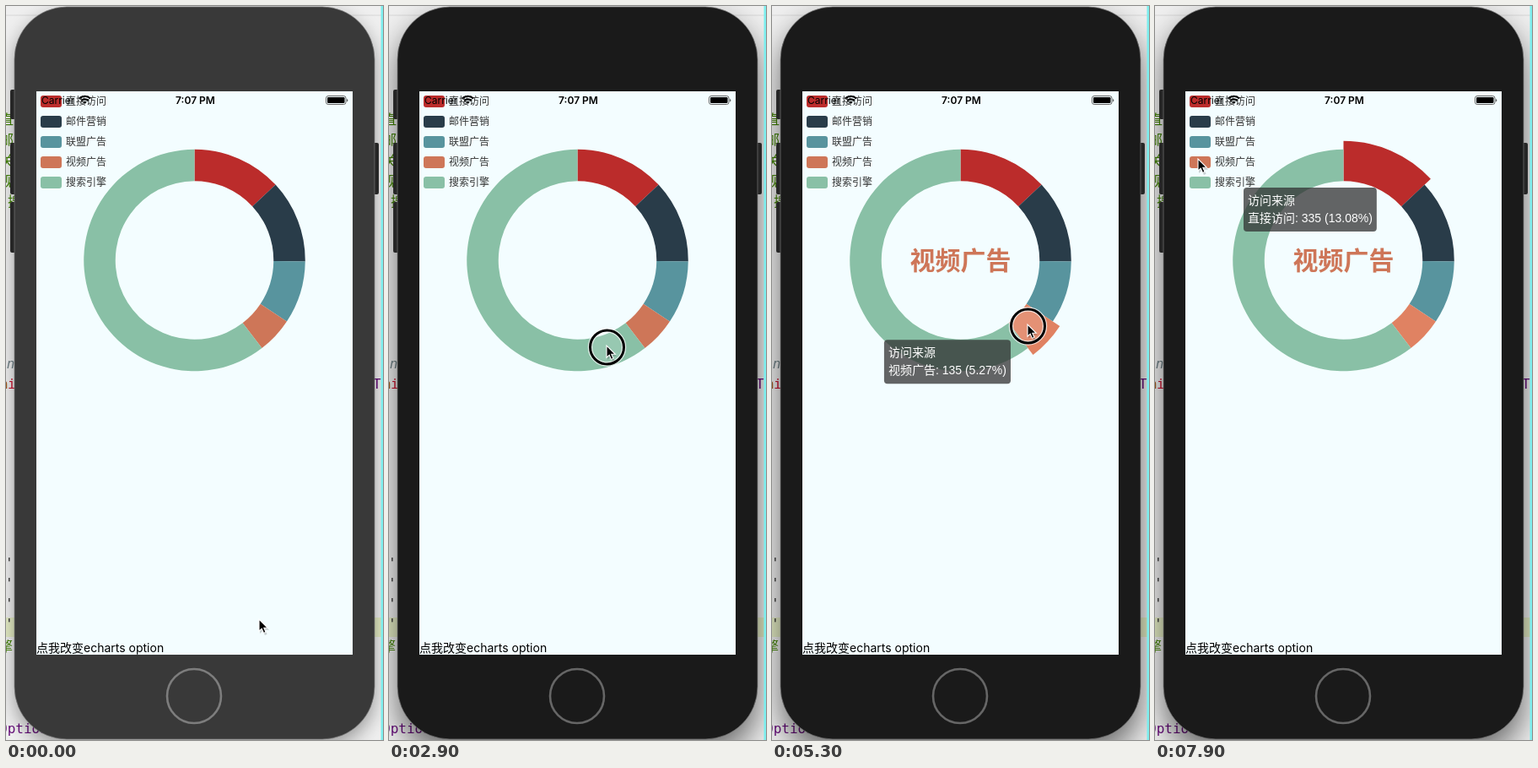
An HTML page that plays this animation: 447 by 869 pixels, repeating every 8000 ms.

```html
<!DOCTYPE html>
<html lang="zh">
<head>
<meta charset="utf-8">
<style>
html, body { margin: 0; width: 100%; height: 100%; overflow: hidden; background: #ebebeb; }
svg { display: block; width: 100vw; height: 100vh; }
text { white-space: pre; }
.code { font: 16px "DejaVu Sans Mono", "Noto Sans CJK SC", monospace; }
.ui { font-family: Inter, "Noto Sans CJK SC", sans-serif; }
.chart { font-family: "Liberation Sans", "Noto Sans CJK SC", sans-serif; }
</style>
</head>
<body>
<svg viewBox="0 0 447 869" preserveAspectRatio="none">
  <defs>
    <filter id="soft" x="-20%" y="-20%" width="140%" height="140%"><feGaussianBlur stdDeviation="11"/></filter>
    <filter id="wide" x="-20%" y="-20%" width="140%" height="140%"><feGaussianBlur stdDeviation="18"/></filter>
    <clipPath id="screen"><rect x="36" y="101" width="375" height="667"/></clipPath>
  </defs>

  <rect width="447" height="869" fill="#efefef"/>
  <path d="M0 11H447" stroke="#d6d6d6"/>
  <rect y="724" width="447" height="23" fill="#e4ecc4"/>
  <g id="editor" class="code"></g>
  <rect id="shadeOff" x="10" y="9" width="427" height="868" rx="62" opacity=".36" filter="url(#soft)"/>
  <rect id="shadeOn" x="10" y="18" width="427" height="868" rx="62" opacity=".56" filter="url(#wide)"/>
  <rect x="444.5" width="3" height="869" fill="#7ceeee"/>

  <g fill="#262626">
    <rect x="5" y="99" width="8" height="35" rx="2"/>
    <rect x="5" y="162" width="8" height="61" rx="2"/>
    <rect x="5" y="232" width="8" height="60" rx="2"/>
    <rect x="434" y="162" width="8" height="61" rx="2"/>
  </g>
  <rect id="body" x="10" y="1" width="427" height="867" rx="62" stroke="#777" stroke-width=".7"/>
  <circle id="home" cx="223" cy="817" r="32" fill="none" stroke-width="2.6"/>

  <g clip-path="url(#screen)">
    <rect x="36" y="101" width="375" height="667" fill="#f3fdff"/>
    <g id="pie"></g>
    <text id="label" class="chart" x="223.5" y="312" font-size="30" font-weight="700" text-anchor="middle"></text>
    <g id="legend" class="chart" font-size="12" fill="#333"></g>
    <g id="tip" class="chart" font-size="14" fill="#fff">
      <rect id="tipBox" height="52" rx="4" fill="#323232" fill-opacity=".75"/>
      <text x="5" y="20">访问来源</text>
      <text id="tipText" x="5" y="41"></text>
    </g>
    <g class="ui" font-size="12" fill="#000">
      <text x="42" y="116">Carrier</text>
      <text x="224.5" y="116" font-weight="600" text-anchor="middle">7:07 PM</text>
      <text x="36" y="765" font-size="14">点我改变echarts option</text>
    </g>
    <g fill="none" stroke="#000" stroke-width="2">
      <path d="M86.8 109.6Q93.5 103.8 100.2 109.6M89.3 112.2Q93.5 108.6 97.7 112.2"/>
      <path d="M91.2 113.6Q93.5 111.8 95.8 113.6L93.5 116Z" fill="#000" stroke="none"/>
    </g>
    <rect x="379.5" y="106.5" width="23.5" height="10" rx="2.6" fill="none" stroke="#555" stroke-width=".9"/>
    <rect x="381" y="108" width="20.5" height="7" rx="1.2"/>
    <path d="M404.4 109.5Q406 111.5 404.4 113.5Z"/>
  </g>

  <g id="cursor">
    <g id="ring" fill="none">
      <circle cx=".5" cy="2" r="20" fill="#fff" fill-opacity=".12" stroke="#fff" stroke-opacity=".75" stroke-width="5.4"/>
      <circle cx=".5" cy="2" r="20" stroke="#000" stroke-width="3"/>
    </g>
    <path d="M1 2V17L4.6 13.8L7 19L9.6 17.8L7.4 12.8H12Z" fill="#000" opacity=".18"/>
    <path d="M0 0V14.2L3.2 11.2L5.5 16.4L8 15.3L5.8 10.3H10.3Z" fill="#000" stroke="#fff" stroke-width="1.1"/>
  </g>
</svg>
<script>
const LOOP = 8000, STEP = 100;
const CX = 223.5, CY = 301, INNER = 93.75, OUTER = 131.25, LIFT = 10;
const $ = id => document.getElementById(id);

const items = [
  { name: '直接访问', value: 335, color: '#bb2c2b', bright: '#ce322e' },
  { name: '邮件营销', value: 310, color: '#293c49', bright: '#2d4250' },
  { name: '联盟广告', value: 234, color: '#58949e', bright: '#5fa5b0' },
  { name: '视频广告', value: 135, color: '#ce7658', bright: '#e08262' },
  { name: '搜索引擎', value: 1548, color: '#89c0a6', bright: '#97d4b7' }
];
const total = items.reduce((sum, d) => sum + d.value, 0);

// [time, highlighted item, tooltip x, tooltip y]; without a position the tooltip stays
const hovers = [
  [3000, 4, 71, 422], [4646, 2, 147, 367], [5150, 3, 132, 397],
  [6300, 1, 159, 276], [6885, 0, 105, 215], [7900, 3]
];
const path = [
  [0, 300, 726], [1800, 300, 726], [2300, 283, 507], [2750, 258, 402],
  [4100, 258, 402], [4600, 317, 347], [4800, 317, 347], [5200, 303, 377],
  [5600, 303, 377], [5900, 308, 365], [6250, 338, 257], [6400, 338, 257],
  [6800, 282, 192], [7100, 282, 192], [7600, 51, 181], [LOOP, 51, 181]
];
const presses = [[2800, 3000], [4600, 5600], [6300, 6400], [6800, 6900]];

const clamp = k => Math.max(0, Math.min(1, k));
const mix = (a, b, k) => a + (b - a) * k;
const quintOut = k => 1 - (1 - k) ** 5;
const elasticOut = k => k <= 0 ? 0 : k >= 1 ? 1
  : 1 + 2 ** (-10 * k) * Math.sin((k - 0.1) * 5 * Math.PI);

function add(parent, tag, attrs, text) {
  const el = document.createElementNS('http://www.w3.org/2000/svg', tag);
  for (const key in attrs) el.setAttribute(key, attrs[key]);
  if (text) el.textContent = text;
  return parent.appendChild(el);
}
const set = (el, attrs) => { for (const key in attrs) el.setAttribute(key, attrs[key]); };

function point(r, turn) {
  const a = turn * 2 * Math.PI;
  return `${CX + r * Math.sin(a)} ${CY - r * Math.cos(a)}`;
}
function sector(from, to, r) {
  const big = to - from > 0.5 ? 1 : 0;
  return `M${point(r, from)}A${r} ${r} 0 ${big} 1 ${point(r, to)}` +
    `L${point(INNER, to)}A${INNER} ${INNER} 0 ${big} 0 ${point(INNER, from)}Z`;
}

let sum = 0;
items.forEach((d, i) => {
  d.from = sum / total;
  sum += d.value;
  d.to = sum / total;
  d.el = add($('pie'), 'path', {});
  d.line = `${d.name}: ${d.value} (${(d.value / total * 100).toFixed(2)}%)`;
  add($('legend'), 'rect', { x: 41, y: 106 + 24 * i, width: 25, height: 14, rx: 3, fill: d.color });
  add($('legend'), 'text', { x: 71, y: 117 + 24 * i }, d.name);
});

const GREEN = '#3f8000', PURPLE = '#660e7a';
[
  [-7, 140, '直', GREEN], [-7, 164, '邮', GREEN], [-7, 189, '关', GREEN], [-7, 213, '视', GREEN],
  [2, 237, '搜', GREEN], [-7, 404, ',', '#777'], [-9, 429, 'on', '#6f8086', 'italic'],
  [-7, 453, 'n', '#a05a20'], [2, 453, 'i', '#c8102e'], [435, 453, 'Te', PURPLE],
  [-1, 665, "'", '#333'], [-1, 689, "'", '#333'], [-1, 713, "'", '#333'], [-1, 737, "'", '#333'],
  [-8, 764, '擎', GREEN], [-8, 861, 'Option', PURPLE]
].forEach(([x, y, s, fill, style]) =>
  add($('editor'), 'text', { x, y, fill, 'font-style': style || 'normal' }, s));

function cursorAt(t) {
  const i = Math.max(1, path.findIndex(p => p[0] > t));
  const [a, b] = [path[i - 1], path[i]];
  const k = clamp((t - a[0]) / (b[0] - a[0]));
  return [mix(a[1], b[1], k), mix(a[2], b[2], k)];
}

function drawPie(t) {
  const now = hovers.findLastIndex(h => h[0] <= t);
  const active = now < 0 ? -1 : hovers[now][1];
  const before = now < 1 ? -1 : hovers[now - 1][1];
  const k = now < 0 ? 0 : elasticOut((t - hovers[now][0]) / 300);
  items.forEach((d, i) => {
    const r = OUTER + LIFT * mix(i === before, i === active, k);
    set(d.el, { d: sector(d.from, d.to, r), fill: i === active ? d.bright : d.color });
  });
  $('label').textContent = active < 0 ? '' : items[active].name;
  if (active >= 0) set($('label'), { fill: items[active].color });
}

function drawTip(t) {
  const moves = hovers.filter(h => h.length > 2 && h[0] <= t);
  set($('tip'), { display: moves.length ? 'inline' : 'none' });
  if (!moves.length) return;
  const to = moves.at(-1), from = moves.at(-2) || to;
  const k = quintOut(clamp((t - to[0]) / 350));
  set($('tip'), { transform: `translate(${mix(from[2], to[2], k)} ${mix(from[3], to[3], k)})` });
  $('tipText').textContent = items[to[1]].line;
  set($('tipBox'), { width: $('tipText').getComputedTextLength() + 10 });
}

function draw(time) {
  const t = Math.floor(time % LOOP / STEP) * STEP;
  const focused = t >= 2800;
  set($('body'), { fill: focused ? '#1a1a1a' : '#393939' });
  set($('home'), { stroke: focused ? '#666' : '#7d7d7d' });
  set($('shadeOn'), { display: focused ? 'inline' : 'none' });
  set($('shadeOff'), { display: focused ? 'none' : 'inline' });
  drawPie(t);
  drawTip(t);
  set($('cursor'), { transform: `translate(${cursorAt(t).join(' ')})` });
  const pressed = presses.some(([a, b]) => t >= a && t < b);
  set($('ring'), { display: pressed ? 'inline' : 'none' });
}

const start = performance.now();
function tick() {
  draw(performance.now() - start);
  requestAnimationFrame(tick);
}
tick();
</script>
</body>
</html>
```
